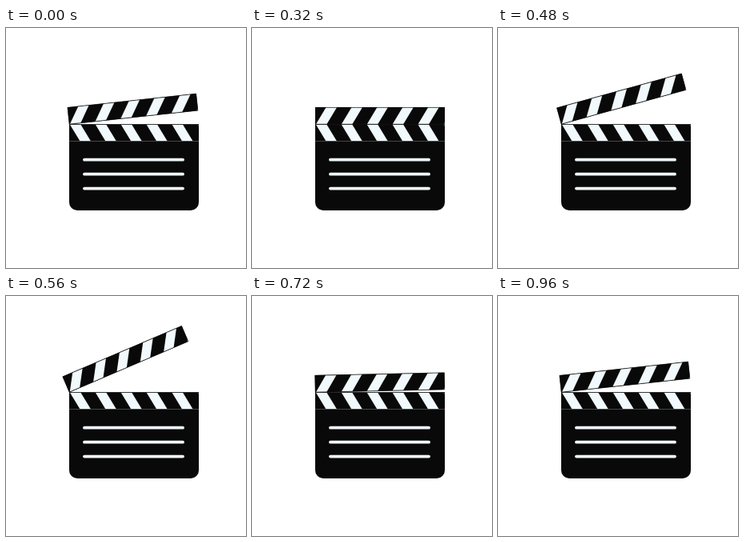
An HTML page with a canvas that plays this animation: 300x300 px, repeating every 1040 ms.

```html
<!DOCTYPE html>
<html lang="en">
<head>
<meta charset="utf-8">
<title>Clapperboard</title>
<style>
  html, body { margin: 0; width: 100%; height: 100%; overflow: hidden; background: #fff; }
  canvas { display: block; width: 300px; height: 300px; }
</style>
</head>
<body>
<canvas id="stage" width="300" height="300"></canvas>
<script>
const ctx = document.getElementById('stage').getContext('2d');
const INK = '#080908', PALE = '#f1f9fc';
const LEFT = 79, WIDTH = 162, HINGE_Y = 120.4, BAR = 21.3;
const STEP = 40, LOOP = 1040;

// [step, opening angle in degrees], linear in between
const KEYS = [[0, 6.1], [8, 0], [14, 23.1], [18, 1.2], [24, 6.1], [26, 6.1]];

function angleAt(step) {
  const i = KEYS.findIndex(k => k[0] > step);
  const [s0, a0] = KEYS[i - 1], [s1, a1] = KEYS[i];
  return a0 + (a1 - a0) * (step - s0) / (s1 - s0);
}

// Striped bar from the hinge; dir 1 extends down, -1 up
function bar(dir) {
  const h = BAR * dir, top = Math.min(0, h);
  ctx.save();
  ctx.beginPath();
  ctx.rect(0, top, WIDTH, BAR);
  ctx.fillStyle = INK;
  ctx.fill();
  ctx.clip();
  ctx.fillStyle = PALE;
  for (let i = 0; i < 6; i++) {
    const x = 0.8 + i * 31.9;
    ctx.beginPath();
    ctx.moveTo(x, 0);
    ctx.lineTo(x + 13.5, 0);
    ctx.lineTo(x + 26.4, h);
    ctx.lineTo(x + 12.9, h);
    ctx.fill();
  }
  ctx.restore();
  ctx.strokeStyle = INK;
  ctx.lineWidth = 0.7;
  ctx.strokeRect(0.35, top + 0.2, WIDTH - 0.7, BAR - 0.4);
}

function line(x0, x1, y, width, color) {
  ctx.beginPath();
  ctx.moveTo(x0, y);
  ctx.lineTo(x1, y);
  ctx.lineWidth = width;
  ctx.strokeStyle = color;
  ctx.stroke();
}

function board() {
  const top = HINGE_Y + BAR;
  ctx.fillStyle = INK;
  ctx.beginPath();
  ctx.roundRect(LEFT, top, WIDTH, 228 - top, [0, 0, 10, 10]);
  ctx.fill();
  ctx.save();
  ctx.translate(LEFT, HINGE_Y);
  bar(1);
  ctx.restore();
  line(LEFT, LEFT + WIDTH, 141.5, 0.8, '#555');
  ctx.lineCap = 'round';
  for (const y of [164.7, 182.7, 200.6]) line(98, 221, y, 3.8, PALE);
  ctx.lineCap = 'butt';
}

function draw(time) {
  const step = Math.floor((time % LOOP) / STEP);
  ctx.fillStyle = '#fff';
  ctx.fillRect(0, 0, 300, 300);
  board();
  ctx.save();
  ctx.translate(LEFT, HINGE_Y);
  ctx.rotate(-angleAt(step) * Math.PI / 180);
  bar(-1);
  ctx.restore();
}

const start = performance.now();
function tick() {
  draw(performance.now() - start);
  requestAnimationFrame(tick);
}
tick();
</script>
</body>
</html>
```
